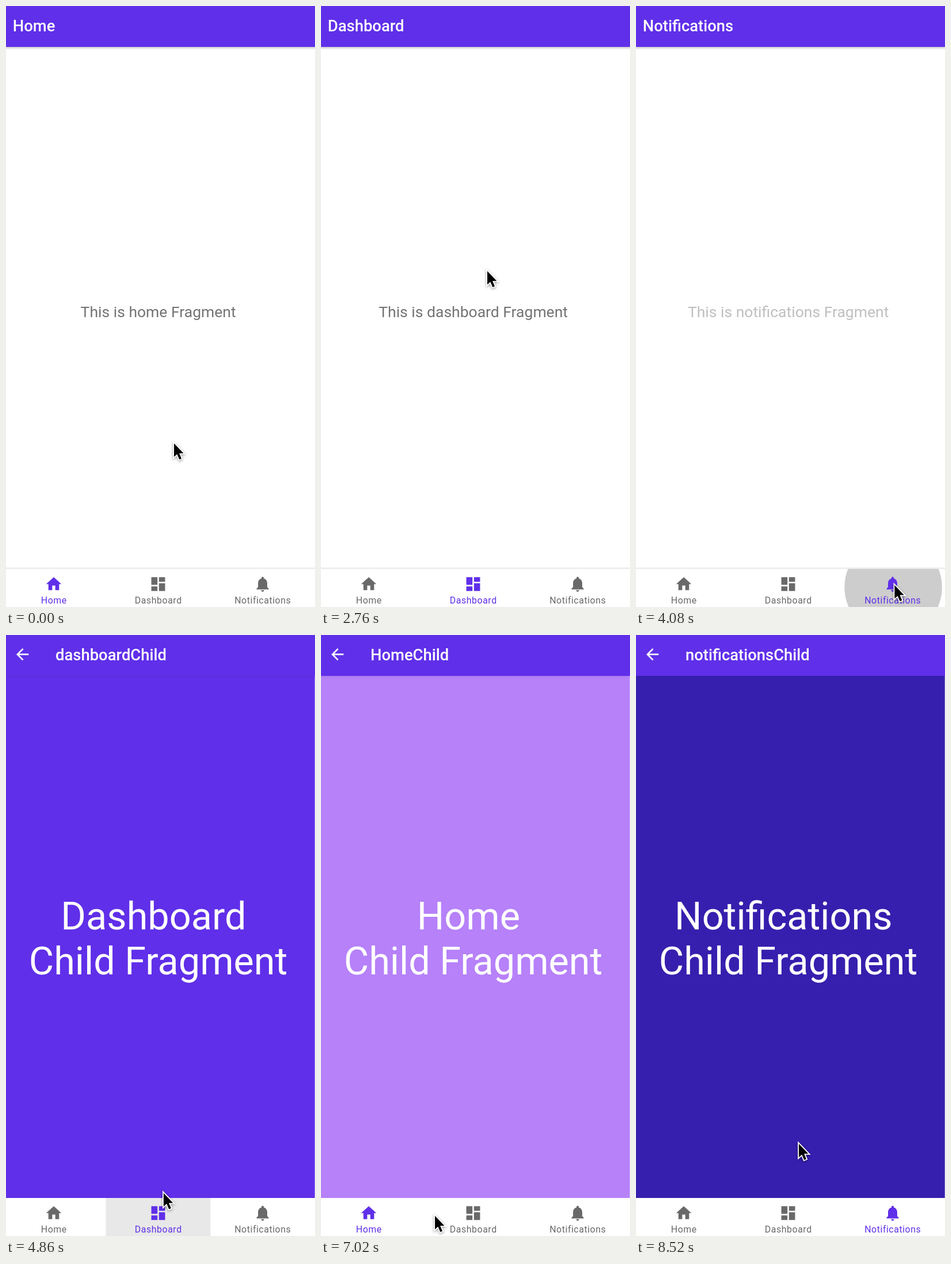
Recreate the animation shown at these times as an HTML page with a canvas. Size 537 by 1043 pixels, loop 8580 ms.

```html
<!DOCTYPE html>
<html lang="en">
<head>
<meta charset="utf-8">
<title>Bottom navigation</title>
<style>
  html, body { margin: 0; width: 100%; height: 100%; overflow: hidden; background: #fff; }
  canvas { display: block; width: 537px; height: 1043px; }
</style>
</head>
<body>
<canvas id="stage" width="537" height="1043"></canvas>
<script>
const ctx = document.getElementById('stage').getContext('2d');
const W = 537, H = 1043, BAR = 71, NAV = 977, MID = 264.6;
const LOOP = 8580, STEP = 60, DP = 1.328;
const PRESS = 90, FADE = 220, TRAVEL = 420, REST = 180;
const PURPLE = '#602fe9', GRAY = '#696969';

const icons = {
  home: new Path2D('M10 20v-6h4v6h5v-8h3L12 3 2 12h3v8z'),
  dashboard: new Path2D('M3 13h8V3H3v10zm0 8h8v-6H3v6zm10 0h8V11h-8v10zm0-18v6h8V3h-8z'),
  bell: new Path2D('M12 22c1.1 0 2-.9 2-2h-4c0 1.1.89 2 2 2zm6-6v-5c0-3.07-1.64-5.64-4.5-6.32V4c0-.83-.67-1.5-1.5-1.5s-1.5.67-1.5 1.5v.68C7.63 5.36 6 7.92 6 11v5l-2 2v1h16v-1l-2-2z'),
  back: new Path2D('M20 11H7.83l5.59-5.59L12 4l-8 8 8 8 1.41-1.41L7.83 13H20v-2z')
};
const arrow = new Path2D('M0 0V23.5L5.3 18.7 9.3 28 13 26.4 9.1 17.3H16.5Z');

const tabs = [
  { name: 'Home', child: 'HomeChild', color: '#b681f9', icon: icons.home },
  { name: 'Dashboard', child: 'dashboardChild', color: PURPLE, icon: icons.dashboard },
  { name: 'Notifications', child: 'notificationsChild', color: '#361fae', icon: icons.bell }
];
const tabX = i => 83 + 181.5 * i;

// What the pointer does: pass a point, open the child by a click, or tap a tab.
const pass = (at, x, y) => ({ at, x, y, wait: 0 });
const open = (at, x, y) => ({ at, x, y, wait: 240, opens: true });
const tap = (at, tab, dx = 4, y = 1005) => ({ at, x: tabX(tab) + dx, y, wait: 60, tab });

const actions = [
  pass(210, 292, 759), open(600, 285, 520),
  pass(1500, 204, 1001), pass(1740, 222, 998), tap(1850, 1),
  open(3000, 289, 460), tap(3890, 2), tap(4420, 1),
  pass(5200, 325, 620), tap(5672, 1, 10, 997), tap(6370, 0),
  pass(7020, 198, 1008), tap(7180, 2),
  open(7920, 265, 489), pass(8520, 283, 883)
];

const clamp = v => Math.max(0, Math.min(1, v));
const mix = (a, b, k) => a + (b - a) * k;
const smooth = k => k * k * (3 - 2 * k);

function pointerAt(t) {
  const i = actions.findIndex(a => a.at - a.wait > t);
  if (i === 0) return actions[0];
  if (i < 0) return actions[actions.length - 1];
  const from = actions[i - 1], to = actions[i];
  const end = to.at - to.wait;
  const start = Math.max(from.at + (from.wait ? REST : 0), end - TRAVEL);
  const k = end > start ? smooth(clamp((t - start) / (end - start))) : 0;
  return { x: mix(from.x, to.x, k), y: mix(from.y, to.y, k) };
}

// Each tab remembers its open child; tapping the current tab closes it.
function screenAt(t) {
  const opened = tabs.map(() => false);
  let current = 0, since = -Infinity;
  for (const { at, tab, opens } of actions) {
    if (opens && at <= t) {
      opened[current] = true;
      since = -Infinity;
    } else if (tab !== undefined && at + PRESS <= t) {
      if (tab === current) opened[tab] = false;
      else since = at + PRESS;
      current = tab;
    }
  }
  return { index: current, tab: tabs[current], child: opened[current], alpha: clamp((t - since) / FADE) };
}

function rect(x, y, w, h, color) {
  ctx.fillStyle = color;
  ctx.fillRect(x, y, w, h);
}

function text(str, x, y, size, color, { weight = 400, align = 'center', spacing = 0 } = {}) {
  ctx.font = `${weight} ${size}px Roboto, sans-serif`;
  ctx.textAlign = align;
  ctx.letterSpacing = spacing + 'px';
  ctx.fillStyle = color;
  ctx.fillText(str, x, y);
}

function icon(path, cx, cy, color) {
  ctx.save();
  ctx.translate(cx - 12 * DP, cy - 12 * DP);
  ctx.scale(DP, DP);
  ctx.fillStyle = color;
  ctx.fill(path);
  ctx.restore();
}

function shadow(y0, y1, alpha) {
  const g = ctx.createLinearGradient(0, y0, 0, y1);
  g.addColorStop(0, `rgba(0,0,0,${alpha})`);
  g.addColorStop(1, 'rgba(0,0,0,0)');
  rect(0, Math.min(y0, y1), W, Math.abs(y1 - y0), g);
}

function drawContent({ tab, child, alpha }) {
  ctx.globalAlpha = alpha;
  if (child) {
    rect(0, BAR, W, NAV - BAR, tab.color);
    rect(W - 1, BAR, 1, NAV - BAR, 'rgba(255,255,255,.3)');
    text(tab.name, MID - 8.2, 511, 66.6, '#fff');
    text('Child Fragment', MID, 589, 66.6, '#fff');
  } else {
    text(`This is ${tab.name.toLowerCase()} Fragment`, MID, 539.5, 26.5, '#737373');
  }
  ctx.globalAlpha = 1;
}

function drawBar({ tab, child }) {
  shadow(BAR, BAR + 5, child ? .04 : .2);
  rect(0, 0, W, BAR, PURPLE);
  if (child) icon(icons.back, 28.6, 33.7, '#fff');
  text(child ? tab.child : tab.name, child ? 86 : 11.8, 44, 27.4, '#fff', { weight: 500, align: 'left' });
}

function drawRipple({ at, tab, x, y }, t) {
  const age = t - at;
  if (tab === undefined || age < 0 || age > 560) return;
  const k = 1 - (1 - clamp(age / 300)) ** 1.3;
  const alpha = .195 * clamp(age / 75) * clamp((560 - age) / 260);
  ctx.save();
  ctx.beginPath();
  ctx.rect(tabX(tab) - 91, NAV, 182, H - NAV);
  ctx.clip();
  ctx.beginPath();
  ctx.arc(mix(x, tabX(tab), k), mix(y, 1010, k), mix(52, 97, k), 0, Math.PI * 2);
  ctx.fillStyle = `rgba(0,0,0,${alpha})`;
  ctx.fill();
  ctx.restore();
}

function drawNav({ index, child }, t) {
  if (!child) shadow(NAV, NAV - 4, .1);
  rect(0, NAV, W, H - NAV, '#fff');
  actions.forEach(action => drawRipple(action, t));
  tabs.forEach((tab, i) => {
    const color = i === index ? PURPLE : GRAY;
    icon(tab.icon, tabX(i), 1003.2, color);
    text(tab.name, tabX(i) + .25, 1037, 15.9, color, { spacing: .55 });
  });
}

function drawPointer({ x, y }) {
  ctx.save();
  ctx.translate(x, y);
  ctx.shadowColor = 'rgba(0,0,0,.4)';
  ctx.shadowBlur = 4;
  ctx.shadowOffsetY = 1.5;
  ctx.lineWidth = 3.6;
  ctx.strokeStyle = '#fff';
  ctx.stroke(arrow);
  ctx.shadowColor = 'transparent';
  ctx.fillStyle = '#000';
  ctx.fill(arrow);
  ctx.restore();
}

function frame(now) {
  const t = Math.floor((now % LOOP) / STEP) * STEP;
  const screen = screenAt(t);
  rect(0, 0, W, H, '#fff');
  drawContent(screen);
  drawBar(screen);
  drawNav(screen, t);
  drawPointer(pointerAt(t));
  requestAnimationFrame(frame);
}
requestAnimationFrame(frame);
</script>
</body>
</html>
```
